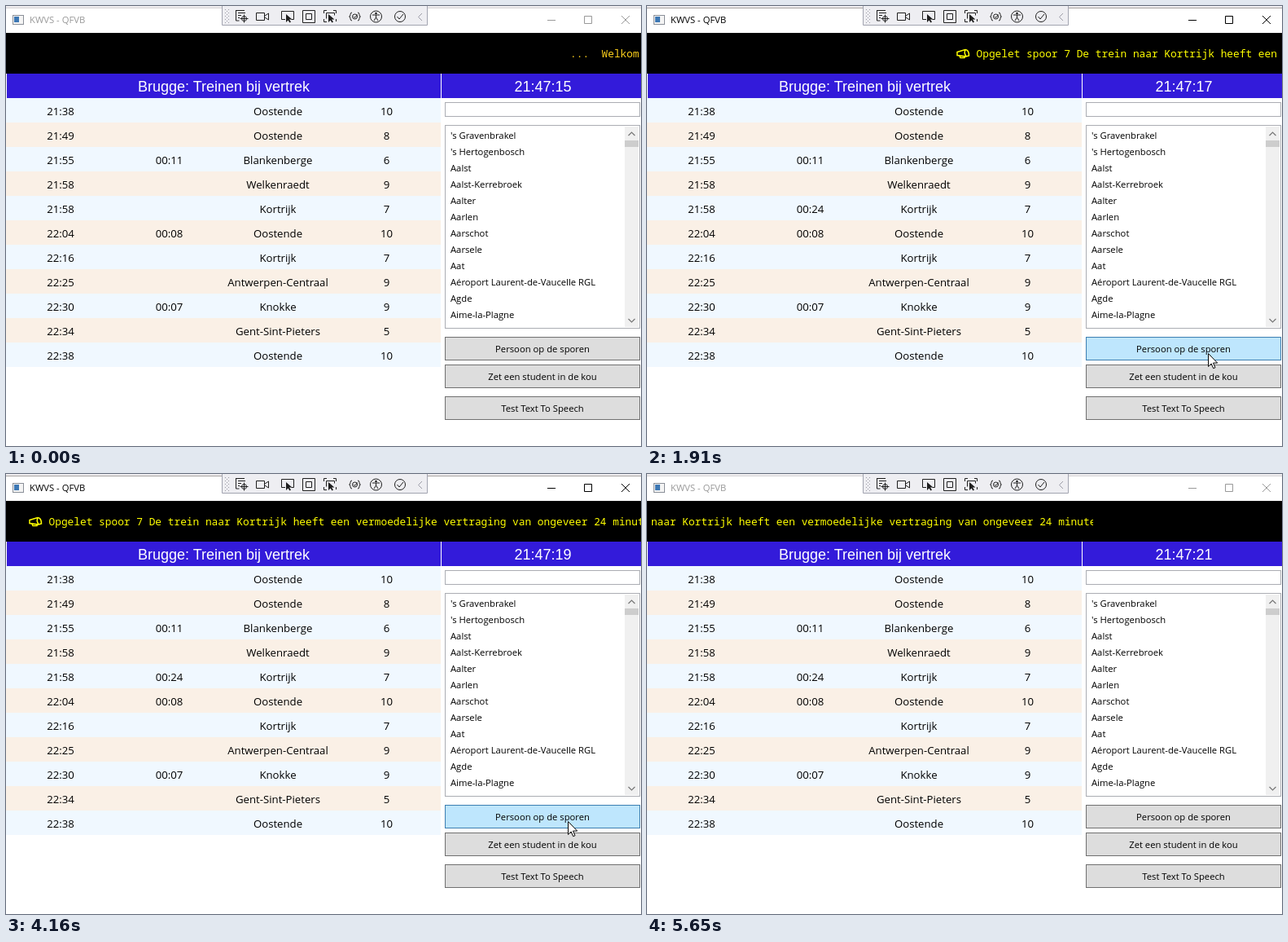
Animation, 780 px wide and 540 px high, one loop 5.76 s. Source, as an HTML page:

```html
<!DOCTYPE html>
<html lang="nl">
<head>
<meta charset="utf-8">
<title>Vertrekbord</title>
<style>
  html, body { margin: 0; width: 100%; height: 100%; overflow: hidden; background: #fff; }
  svg { display: block; }
  text { white-space: pre; }
  .ui { font: 11.25px "Open Sans", "Noto Sans", sans-serif; }
  .cell { font: 13.2px "Open Sans", "Noto Sans", sans-serif; text-anchor: middle; }
  .head { font: 18px "Liberation Sans", Arial, sans-serif; fill: #fff; text-anchor: middle; }
  .mono { font: 12.83px "Noto Sans Mono", "DejaVu Sans Mono", monospace; }
  .mid { text-anchor: middle; }
</style>
</head>
<body>
<svg id="stage" width="780" height="540" viewBox="0 0 780 540">
  <defs>
    <clipPath id="bannerClip"><rect x="0" y="33" width="780" height="50"/></clipPath>
    <clipPath id="messageClip"><rect y="33" width="780" height="50"/></clipPath>
    <clipPath id="listClip"><rect x="540" y="147" width="220" height="248"/></clipPath>
  </defs>
  <rect width="780" height="540" fill="#fff"/>

  <!-- title bar -->
  <rect width="780" height="2" fill="#eeecee"/>
  <rect id="topEdge" y="2" width="780" height="1" fill="#d8d6d8"/>
  <rect x="8.5" y="11.5" width="13" height="11" fill="#f4f4f4" stroke="#8a8f98"/>
  <rect x="10" y="13" width="6" height="7" fill="#3d78b4"/>
  <text id="title" class="ui" x="29" y="21">KWVS - QFVB</text>
  <path id="windowButtons" fill="none" d="M665 17.5h10M710.5 12.5h9v9h-9zM756 12l10 10M766 12l-10 10"/>

  <!-- floating toolbar -->
  <path d="M265.5 0V23.5H517.5V0" fill="#eeeef2" stroke="#a2a4b0"/>
  <path d="M269.5 4v17M273.5 4v17M271.5 6v15" stroke="#9b9ba5" stroke-dasharray="1 3"/>
  <g fill="none" stroke="#1e1e1e">
    <path d="M282 5.5h11M282.5 5v13h4M285 8.5h9M285 11.5h4M285 14.5h2"/>
    <circle cx="292.500" cy="15.500" r="3"/><path d="M292.500 10.500v10M287.500 15.500h10"/>
    <path d="M307.500 8.500h10v9h-10zM318 12l4.500-3v8l-4.500-3"/>
    <path d="M343 16.500h-4.500v-10h15v10h-3"/>
    <path d="M364.500 5.500h15v15h-15zM368.500 9.500h7v7h-7z"/>
    <path d="M390.500 9v-3.500h3.500M402 5.500h3.500v3.500M390.500 16v3.500h3.500M393.500 15.500v-7h10v3M405.500 16v3"/>
    <path d="M425 8q-2 0-2 2.500t-1.500 2.500q1.500 0 1.500 2.500t2 2.500M432 8q2 0 2 2.500t1.500 2.500q-1.500 0-1.500 2.500t-2 2.500"/>
    <circle cx="428.500" cy="13" r="3"/><path d="M427 13l1.500 1.500 3-4"/>
    <circle cx="454.500" cy="13" r="7"/><path d="M450 11h9M454.500 11v3l-2.500 4M454.500 14l2.500 4"/>
    <circle cx="484" cy="13" r="6.500"/><path d="M480.500 13l2.500 3 5-6"/>
    <path d="M511 9l-4.500 4.500 4.500 4.500" stroke="#9b9ba5"/>
  </g>
  <g fill="#1e1e1e">
    <circle cx="454.500" cy="9" r="1.300"/>
    <path d="M344 10v10l2.500-2.500 2 3 1.500-1-2-3h3.500zM396 10v10l2.500-2.500 2 3 1.500-1-2-3h3.500z"/>
  </g>

  <!-- banner -->
  <rect y="33" width="780" height="50" fill="#000"/>
  <g clip-path="url(#bannerClip)">
    <g id="banner" class="mono" clip-path="url(#messageClip)">
      <text id="welcome" x="15" y="63">...  Welkom ...</text>
      <g id="notice" fill="#ff0">
        <path d="M21 56.500L31 53.500Q35.500 54 35.500 61L32 62 21 60.500zM24 61.500l1 2h5l.5-1.500M31 54q-2 4 1 7.500" fill="none" stroke="#ff0" stroke-width="1.500"/>
        <text x="44.500" y="63">Opgelet spoor 7 De trein naar Kortrijk heeft een vermoedelijke vertraging van ongeveer 24 minuten</text>
      </g>
    </g>
  </g>

  <!-- headers -->
  <path d="M1 83h533v30H1zM535 83h245v30H535z" fill="#331bda"/>
  <text class="head" x="267.500" y="105">Brugge: Treinen bij vertrek</text>
  <text id="clock" class="head" x="659.500" y="105"></text>

  <g id="board"></g>

  <!-- search box and station list -->
  <g fill="#fff" stroke="#abadb3">
    <rect x="539.500" y="118.500" width="239" height="17"/>
    <rect x="539.500" y="146.500" width="239" height="249"/>
  </g>
  <g id="stations" class="ui" clip-path="url(#listClip)"></g>
  <rect x="760" y="148" width="17" height="246" fill="#f0f0f0"/>
  <rect x="760" y="165" width="17" height="8" fill="#cdcdcd"/>
  <path d="M764.500 159l4-4 4 4M764.500 384l4 4 4-4" fill="none" stroke="#777" stroke-width="1.200"/>

  <g id="buttons" class="ui mid"></g>
  <path id="cursor" d="M.5.500V16.500L4.200 13 6.700 18.700 9 17.700 6.500 12.100H11.700Z" fill="#fff" stroke="#000"/>
</svg>
<script>
const LOOP = 5760, STEP_PX = 16, CLICK = 1410, ANSWER = 1710, BLUR = 5350;
const $ = id => document.getElementById(id);

const departures = [
  ["21:38", "", "Oostende", 10], ["21:49", "", "Oostende", 8],
  ["21:55", "00:11", "Blankenberge", 6], ["21:58", "", "Welkenraedt", 9],
  ["21:58", "00:24", "Kortrijk", 7], ["22:04", "00:08", "Oostende", 10],
  ["22:16", "", "Kortrijk", 7], ["22:25", "", "Antwerpen-Centraal", 9],
  ["22:30", "00:07", "Knokke", 9], ["22:34", "", "Gent-Sint-Pieters", 5],
  ["22:38", "", "Oostende", 10]
];
const DELAYED = 4;
const stations = ["'s Gravenbrakel", "'s Hertogenbosch", "Aalst", "Aalst-Kerrebroek", "Aalter", "Aarlen",
  "Aarschot", "Aarsele", "Aat", "Aéroport Laurent-de-Vaucelle RGL", "Agde", "Aime-la-Plagne", "Alken"];
const buttons = [["Persoon op de sporen", 406], ["Zet een student in de kou", 440], ["Test Text To Speech", 479]];

$("board").innerHTML = departures.map((row, r) => {
  const y = 113 + r * 30;
  const cells = row.map((value, c) =>
    `<text class="cell" ${r === DELAYED && c === 1 ? 'id="delay"' : ""} x="${67 + c * 133.5}" y="${y + 21}">${value}</text>`);
  return `<rect y="${y}" width="534" height="30" fill="${r % 2 ? "#faf0e6" : "#f0f8ff"}"/>` + cells.join("");
}).join("");

$("stations").innerHTML = stations.map((name, i) =>
  `<text x="546" y="${163 + i * 19.96}">${name}</text>`).join("");

$("buttons").innerHTML = buttons.map(([label, y]) =>
  `<rect x="539.5" y="${y + .5}" width="239" height="28"/><text x="659" y="${y + 19}">${label}</text>`).join("");
const buttonRects = [...$("buttons").querySelectorAll("rect")];

const uneven = { 5: 90, 11: 120, 15: 200, 24: 120, 38: 110, 39: 120, 45: 90, 55: 110 };
const ticks = [0];
for (let i = 0; i < 55; i++) ticks.push(ticks[i] + (uneven[i] || 100));

// time, x, y of the pointer tip
const pointerPath = [
  [400, 776, 500], [590, 722, 490], [690, 702, 462], [890, 689, 432], [1310, 689, 432], [1410, 689, 426],
  [4460, 690, 426], [4660, 738, 488], [4750, 751, 511], [4850, 752, 515], [4950, 752, 528], [5050, 752, 541]
];

function pointerAt(t) {
  const next = pointerPath.findIndex(p => p[0] > t);
  if (next < 1) return null;
  const [a, b] = [pointerPath[next - 1], pointerPath[next]];
  const k = (t - a[0]) / (b[0] - a[0]);
  return [1, 2].map(i => Math.round(a[i] + (b[i] - a[i]) * k));
}

function buttonStyle(hover, pressed) {
  if (pressed) return ["#c4e5f6", "#2c628b"];
  return hover ? ["#bee6fd", "#3c7fb1"] : ["#ddd", "#707070"];
}

function draw(time) {
  const tick = ticks.findLastIndex(start => start <= time);
  const t = ticks[tick];
  const answered = t >= ANSWER;
  const active = t >= CLICK && t < BLUR;

  $("banner").setAttribute("transform", `translate(${(answered ? 648 : 678) - STEP_PX * tick} 0)`);
  $("welcome").setAttribute("display", answered ? "none" : "inline");
  $("welcome").setAttribute("fill", tick ? "#ff0" : "#ffd21c");
  $("notice").setAttribute("display", answered ? "inline" : "none");
  $("delay").setAttribute("display", answered ? "inline" : "none");

  $("clock").textContent = "21:47:" + (15 + Math.floor((t + 570) / 1000));
  $("title").setAttribute("fill", active ? "#000" : "#999");
  $("windowButtons").setAttribute("stroke", active ? "#000" : "#999");
  $("topEdge").setAttribute("fill", active ? "#a9a4a2" : "#d8d6d8");

  const tip = pointerAt(t);
  $("cursor").setAttribute("display", tip ? "inline" : "none");
  if (tip) $("cursor").setAttribute("transform", `translate(${tip})`);
  buttonRects.forEach((rect, i) => {
    const top = buttons[i][1];
    const hover = tip && tip[1] >= top && tip[1] < top + 29;
    const [fill, stroke] = buttonStyle(hover, hover && t >= CLICK && !answered);
    rect.setAttribute("fill", fill);
    rect.setAttribute("stroke", stroke);
  });
}

const begin = performance.now();
function loop() {
  draw((performance.now() - begin) % LOOP);
  requestAnimationFrame(loop);
}
loop();
</script>
</body>
</html>
```
